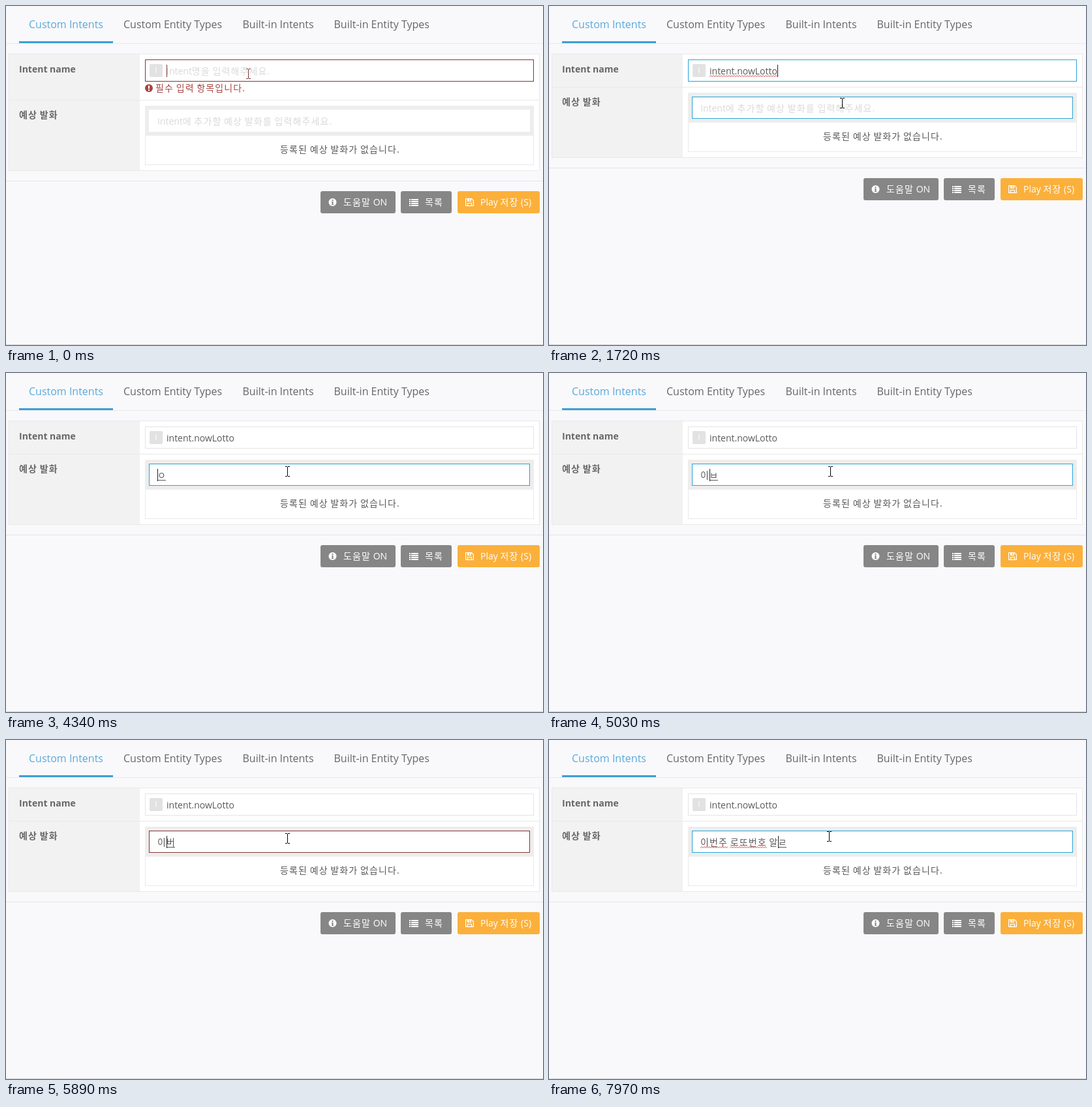
Animation of 823x520 px, one loop 8000 ms. Source, as an HTML page with a canvas:

```html
<!DOCTYPE html>
<html lang="ko">
<head>
<meta charset="utf-8">
<title>Intent form</title>
<style>
html, body { margin: 0; width: 100%; height: 100%; overflow: hidden; background: #f9f9fb; }
canvas { display: block; width: 823px; height: 520px; }
</style>
</head>
<body>
<canvas id="stage"></canvas>
<script>
const W = 823, H = 520, LOOP = 8000;
const canvas = document.getElementById('stage');
const ctx = canvas.getContext('2d');
const dpr = window.devicePixelRatio || 1;
canvas.width = W * dpr;
canvas.height = H * dpr;

const FAMILY = '"Open Sans", "Noto Sans CJK KR", "Noto Sans CJK", sans-serif';
const RED = [132, 53, 52], BLUE = [41, 165, 217], GRAY = [228, 228, 228], WHITE = [255, 255, 255];
const TEXT = '#5a5a5a', HINT = '#d9d9d9', ERROR = '#a94442', LINE = '#e9e9ea';
const INK = '#222', ERROR_INK = '#7a3437';
const HANGUL = /([\u3131-\u318e\uac00-\ud7a3]+)/;

// [time, committed text, syllable being composed]
const NAME = [
  [0, '', ''], [1080, 'intent.nowLotto', ''],
  [2470, 'intent.nowLotto', 'ㅇ'], [3170, 'intent.nowLotto', '']
];
const PHRASE = [
  [0, '', ''], [4340, '', 'ㅇ'], [4570, '', ''], [4800, '', 'ㅇ'], [4960, '', '이'],
  [5030, '이', 'ㅂ'], [5350, '이', '버'], [5430, '이', '번'],
  [5580, '', ''], [5670, '', 'ㅇ'], [5740, '', '이'], [5820, '이', 'ㅂ'], [5890, '이', '버'],
  [5960, '이', '번'], [6040, '이번', 'ㅈ'], [6110, '이번', '주'], [6420, '이번주 ', ''],
  [6500, '이번주 ', 'ㄹ'], [6580, '이번주 ', '로'], [6810, '이번주 로', 'ㄸ'], [6890, '이번주 로', '또'],
  [7040, '이번주 로또', 'ㅂ'], [7120, '이번주 로또', '버'], [7190, '이번주 로또', '번'],
  [7360, '이번주 로또번', 'ㅎ'], [7440, '이번주 로또번', '호'], [7510, '이번주 로또번호 ', ''],
  [7660, '이번주 로또번호 ', 'ㅇ'], [7740, '이번주 로또번호 ', '아'],
  [7820, '이번주 로또번호 ', '알'], [7970, '이번주 로또번호 알', 'ㄹ']
];
const MOUSE = [
  [0, [371, 104]], [1230, [371, 104]], [1650, [449, 149]], [1780, [449, 149]], [1860, [436, 149]],
  [2090, [432, 149]], [2240, [432, 150]], [2320, [431, 151]],
  [7660, [431, 151]], [7890, [429, 148]]
];
const NAME_BORDER = [[0, RED], [1080, RED], [1310, BLUE], [3490, BLUE], [3640, GRAY]];
const PHRASE_BORDER = [
  [0, WHITE], [1540, WHITE], [1690, BLUE], [5580, BLUE], [5740, RED], [5960, RED], [6190, BLUE]
];
// Each time toggles the caret, which starts visible.
const BLINKS = [230, 760, 2010, 2470, 3020, 3170, 4040, 4340];

const stepAt = (rows, t) => rows.filter(r => r[0] <= t).pop();

function tween(keys, t) {
  const i = keys.findIndex(k => k[0] > t);
  if (i < 0) return keys[keys.length - 1][1];
  const [t0, a] = keys[i - 1], [t1, b] = keys[i];
  const p = (t - t0) / (t1 - t0);
  return a.map((v, n) => Math.round(v + (b[n] - v) * p));
}

function rect(x, y, w, h, color) {
  ctx.fillStyle = color;
  ctx.fillRect(x, y, w, h);
}

function box(x, y, w, h, fill, border) {
  rect(x, y, w, h, border);
  rect(x + 1, y + 1, w - 2, h - 2, fill);
}

function rounded(x, y, w, h, r, color) {
  ctx.fillStyle = color;
  ctx.beginPath();
  ctx.roundRect(x, y, w, h, r);
  ctx.fill();
}

function disc(x, y, r, color) {
  ctx.fillStyle = color;
  ctx.beginPath();
  ctx.arc(x, y, r, 0, Math.PI * 2);
  ctx.fill();
}

// Draws Hangul on a one-em pitch and returns the end of the line.
function text(str, x, y, color = TEXT, size = 14, weight = 400) {
  ctx.font = `${weight} ${size}px ${FAMILY}`;
  ctx.fillStyle = color;
  for (const run of str.split(HANGUL)) {
    ctx.letterSpacing = '0px';
    if (HANGUL.test(run)) {
      const gap = size - ctx.measureText('가').width;
      ctx.letterSpacing = gap + 'px';
    }
    ctx.fillText(run, x, y);
    x += ctx.measureText(run).width;
  }
  ctx.letterSpacing = '0px';
  return x;
}

const widthOf = str => text(str, 0, -100);

function squiggle(x0, x1, y) {
  ctx.strokeStyle = '#e0403c';
  ctx.lineWidth = 1;
  ctx.beginPath();
  for (let x = x0, up = false; x <= x1; x += 2, up = !up) ctx.lineTo(x, y + (up ? -1 : 1));
  ctx.stroke();
}

function errorNote(x, y) {
  disc(x + 6, y, 6, ERROR);
  rect(x + 5, y - 4, 2, 5, '#fff');
  rect(x + 5, y + 2, 2, 2, '#fff');
  text('필수 입력 항목입니다.', x + 16, y + 5, ERROR);
}

// Field content: hint or typed text, composed syllable, caret.
function field(row, hint, x, base, caret) {
  const [, done, comp] = row;
  if (!done && !comp) text(hint, x, base, HINT);
  const end = text(done, x, base);
  if (comp) {
    text(comp, end, base);
    rect(Math.round(end) + 1, base + 2, 12, 1, TEXT);
  }
  if (caret) rect(Math.round(end), base - 15, 1, 19, caret);
}

function tabs() {
  text('Custom Intents', 35, 34, '#5aa9da', 16);
  text('Custom Entity Types', 180, 34, '#666', 16);
  text('Built-in Intents', 362.5, 34, '#666', 16);
  text('Built-in Entity Types', 502.5, 34, '#666', 16);
  rect(0, 57, W, 1, LINE);
  rect(20, 54, 144, 3, '#3c9fd6');
}

function buttons(y) {
  rounded(482, y, 115, 34, 3, '#868686');
  rounded(605, y, 78, 34, 3, '#868686');
  rounded(692, y, 126, 34, 3, '#fbb03b');
  text('도움말 ON', 517, y + 22, '#fff');
  text('목록', 642, y + 22, '#fff');
  text('Play 저장 (S)', 727, y + 22, '#fff');

  disc(500.5, y + 17, 6, '#fff');
  rect(499.5, y + 13, 2, 2, '#868686');
  rect(499, y + 16, 2.5, 1, '#868686');
  rect(499.5, y + 16, 2, 4, '#868686');
  rect(499, y + 20, 3, 1, '#868686');

  for (let i = 0; i < 4; i++) {
    rect(618, y + 12 + i * 3, 2, 2, '#fff');
    rect(621, y + 12 + i * 3, 11, 2, '#fff');
  }

  ctx.strokeStyle = '#fff';
  ctx.lineWidth = 1.2;
  ctx.beginPath();
  ctx.moveTo(704.6, y + 11.6);
  ctx.lineTo(713.5, y + 11.6);
  ctx.lineTo(716.4, y + 14.5);
  ctx.lineTo(716.4, y + 22.4);
  ctx.lineTo(704.6, y + 22.4);
  ctx.closePath();
  ctx.stroke();
  ctx.strokeRect(707.5, y + 18.5, 6, 4);
  rect(707, y + 12, 6, 4, '#fff');
  rect(710, y + 12.5, 1.5, 2.5, '#fbb03b');
}

function mouse([x, y], color) {
  for (const end of [y - 8, y + 7]) {
    rect(x - 3, end, 3, 1, color);
    rect(x + 1, end, 3, 1, color);
  }
  rect(x, y - 7, 1, 14, color);
}

function draw(t) {
  const nameError = t < 1080, phraseError = t >= 5580 && t < 5670;
  const top = nameError ? 20 : 0;
  const low = top + (phraseError ? 20 : 0);
  const lit = BLINKS.filter(b => b <= t).length % 2 === 0;
  const caret = lit && (nameError || phraseError ? ERROR_INK : INK);
  const onName = t < 3490;

  ctx.setTransform(dpr, 0, 0, dpr, 0, 0);
  rect(0, 0, W, H, '#f9f9fb');
  tabs();

  box(4, 73, 814, 160 + low, '#fff', LINE);
  rect(5, 74, 200, 158 + low, '#f2f2f2');
  rect(4, 124 + top, 814, 1, LINE);
  text('Intent name', 20, 102, '#666', 14, 700);
  text('예상 발화', 20, 152 + top, '#666', 14, 700);

  box(213, 82, 596, 34, '#fff', `rgb(${tween(NAME_BORDER, t)})`);
  rounded(220, 89, 20, 20, 2, '#e2e2e2');
  text('I', 228.3, 103, '#fff', 12);
  field(stepAt(NAME, t), 'Intent명을 입력해주세요.', 246, 105, onName && caret);
  if (t >= 1080 && t < 2470) squiggle(246, 350, 107.5);
  if (nameError) errorNote(213, 126);

  rect(213, 133 + top, 596, 46 + low - top, '#ededed');
  box(219, 139 + top, 584, 34, '#fff', `rgb(${tween(PHRASE_BORDER, t)})`);
  const phrase = stepAt(PHRASE, t);
  field(phrase, 'Intent에 추가할 예상 발화를 입력해주세요.', 232, 162 + top, !onName && caret);
  if (t >= 6420) squiggle(232, 274, 164.5);
  if (t >= 7510) {
    const start = 232 + widthOf('이번주 ');
    squiggle(start, start + 56, 164.5);
  }
  if (phraseError) errorNote(219, 183);

  box(213, 178 + low, 596, 46, '#fff', LINE);
  rect(213, 178 + low, 596, 1, '#ededed');
  text('등록된 예상 발화가 없습니다.', 420, 205 + low);

  rect(0, 248 + low, W, 1, '#e6e6e7');
  buttons(264 + low);
  rect(0, 519, W, 1, '#d4d4d6');
  mouse(tween(MOUSE, t), nameError ? ERROR_INK : '#000');
}

const start = performance.now();
function loop() {
  draw((performance.now() - start) % LOOP);
  requestAnimationFrame(loop);
}
loop();
</script>
</body>
</html>
```
